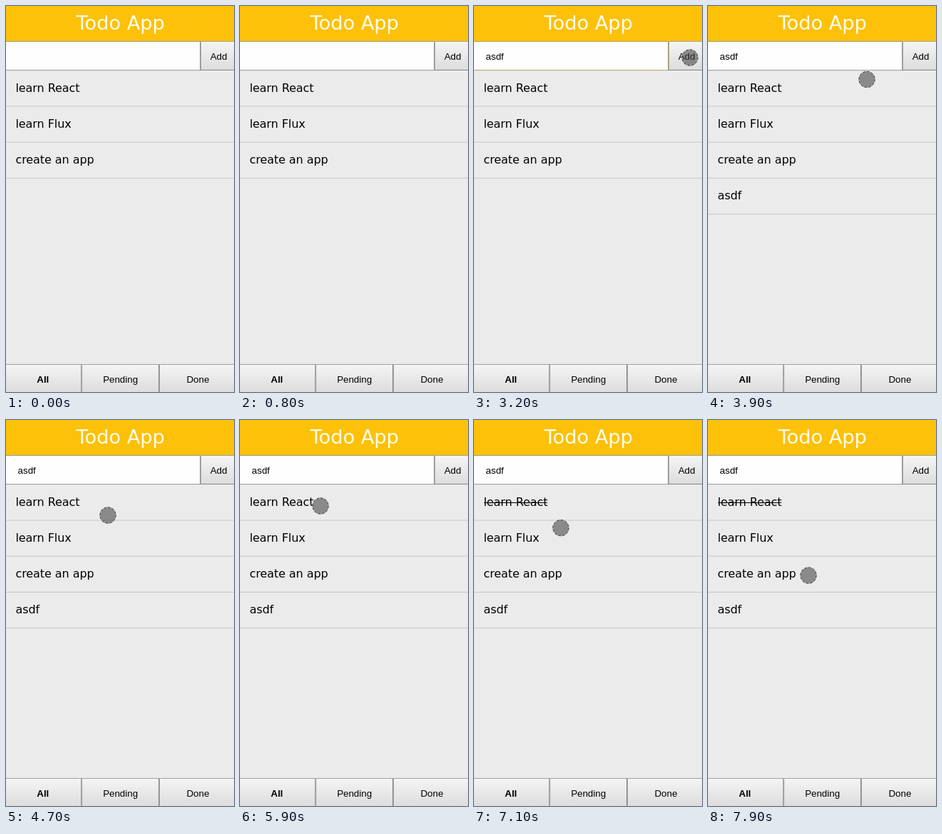
An HTML page for the animation above (8000 ms loop, 320 by 539 pixels).

```html
<!DOCTYPE html>
<html lang="en">
<head>
<meta charset="utf-8">
<title>Todo App</title>
<style>
  html, body { margin: 0; height: 100%; overflow: hidden; background: #ebebeb; }
  svg { display: block; width: 320px; height: 539px; }
  text { font: 16px "DejaVu Sans", sans-serif; letter-spacing: -.06px; }
  .title { font-size: 27.2px; fill: #fffdf0; text-anchor: middle; letter-spacing: 0; }
  .ui { font: 13.33px "Liberation Sans", Arial, sans-serif; letter-spacing: 0; }
  .label { text-anchor: middle; }
  .bold { font-weight: bold; }
  .rule { stroke: #c6c6c6; }
</style>
</head>
<body>
<svg viewBox="0 0 320 539">
  <defs>
    <linearGradient id="face" x2="0" y2="1">
      <stop stop-color="#f5f5f5"/>
      <stop offset="1" stop-color="#dcdcdc"/>
    </linearGradient>
  </defs>
  <rect width="320" height="539" fill="#ebebeb"/>
  <rect width="320" height="50" fill="#fcc108"/>
  <text class="title" x="160.7" y="33">Todo App</text>
  <rect id="field" x="-1.5" y="49.5" width="274" height="40.2" fill="#fefefe"/>
  <text id="entry" class="ui" x="16.6" y="75"></text>
  <g id="items"></g>
  <g id="buttons"></g>
  <path id="strike" d="M14 115.5H103" stroke="#000"/>
  <g id="touch">
    <circle r="11.5" fill="#444" fill-opacity=".58"/>
    <circle r="11" fill="none" stroke="#aaa"/>
    <circle r="11" fill="none" stroke="#333" stroke-dasharray="3 2.76"/>
  </g>
</svg>
<script>
const LOOP = 8000;
const $ = id => document.getElementById(id);

const item = (name, i) => `<g><text x="13.4" y="${120 + 50.1 * i}">${name}</text>
  <path class="rule" d="M0 ${140 + 50.2 * i}H320"/></g>`;
const button = (name, x, y, w, h, extra = '') => `
  <rect x="${x}" y="${y}" width="${w}" height="${h}" fill="url(#face)"/>
  <path d="M${x + .5} ${y + h}V${y + .5}H${x + w}" fill="none" stroke="#a2a2a2"/>
  <path d="M${x} ${y + h - .5}H${x + w - .5}V${y}" fill="none" stroke="#858585"/>
  <text class="ui label ${extra}" x="${x + w / 2}" y="${y + h / 2 + 5.5}">${name}</text>`;

$('items').innerHTML = ['learn React', 'learn Flux', 'create an app', 'asdf'].map(item).join('');
$('buttons').innerHTML = button('Add', 273, 49, 51, 41) +
  ['All', 'Pending', 'Done'].map((name, i) =>
    button(name, -2.6 + 108.8 * i, 500, 108.8, 40, i ? '' : 'bold')).join('');

// Touch pointer stops: time, x, y
const path = [
  [1400, 150, 95], [1800, 94, 68], [2700, 94, 68], [3100, 303, 72],
  [3700, 303, 72], [4100, 143, 133], [4800, 143, 133], [5300, 113, 120],
  [6800, 113, 120], [7600, 141, 217], [LOOP, 141, 217]
];
const ease = u => u * u * (3 - 2 * u);

function pointer(t) {
  const i = path.findIndex(p => p[0] > t);
  const [t0, x0, y0] = path[i - 1], [t1, x1, y1] = path[i];
  const u = ease((t - t0) / (t1 - t0));
  return [x0 + (x1 - x0) * u, y0 + (y1 - y0) * u];
}

const show = (el, on) => el.setAttribute('visibility', on ? 'visible' : 'hidden');
const start = performance.now();

function draw(now) {
  const t = Math.floor(Math.max(0, now - start) % LOOP / 100) * 100;
  const focused = t >= 1800 && t < 3300;
  $('field').setAttribute('stroke', focused ? '#b3a06a' : '#929b98');
  $('entry').textContent = 'asdf'.slice(0, Math.max(0, Math.floor((t - 2200) / 100)));
  show($('items').lastElementChild, t >= 3300);
  show($('strike'), t >= 6000);
  show($('touch'), t >= path[0][0]);
  if (t >= path[0][0]) $('touch').setAttribute('transform', `translate(${pointer(t)})`);
  requestAnimationFrame(draw);
}
draw(start);
</script>
</body>
</html>
```
